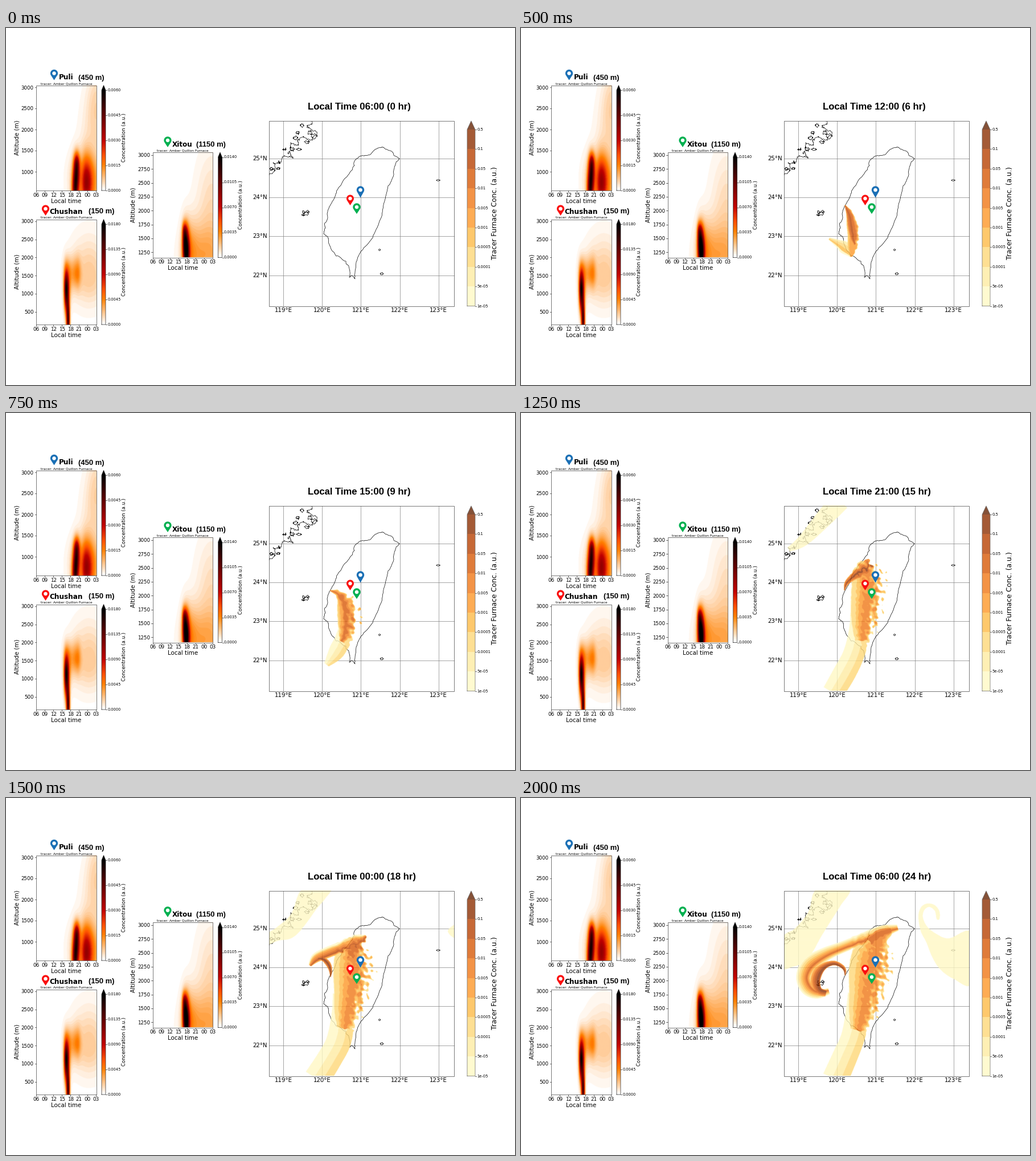
Write a matplotlib script that moves like this. It is 894 px wide and 626 px high and loops after 2.25 s.

```python
import numpy as np
import matplotlib.pyplot as plt
from matplotlib.animation import FuncAnimation
from matplotlib.patches import Circle, Polygon, Rectangle
from matplotlib.path import Path

W, H, DPI = 894, 626, 100
STEPS = 9
LEFT, RIGHT, TOP, BOTTOM = 462, 787, 163, 487.5
DEG = 68.2
SITE = "Amber Quillon Furnace"
BLUE, RED, GREEN = "#1a6fb5", "#fa0f0f", "#00b050"
HEAT = plt.get_cmap("gist_heat_r")
SCALE = plt.get_cmap("YlOrBr")(np.arange(1, 11) / 10)
SCALE[:, 3] = 0.8

rng = np.random.default_rng(12)
fig = plt.figure(figsize=(W / DPI, H / DPI), dpi=DPI, facecolor="white")
ax = fig.add_axes([0, 0, 1, 1])
ax.set(xlim=(0, W), ylim=(H, 0))
ax.axis("off")


def label(x, y, text, px, **style):
    style = {"ha": "center", "va": "center", "family": "DejaVu Sans"} | style
    return ax.text(x, y, text, size=px * 0.72, **style)


def line(xs, ys, color="0.15", lw=0.5, **style):
    return ax.plot(xs, ys, color=color, lw=lw, **style)[0]


def box(x0, y0, x1, y1, zorder=6):
    ax.add_patch(Rectangle((x0, y0), x1 - x0, y1 - y0, fill=False,
                           ec="0.25", lw=0.5, zorder=zorder))


def picture(data, x0, y0, x1, y1, **style):
    return ax.imshow(data, extent=(x0, x1, y1, y0), aspect="auto", **style)


def pin(x, y, color, r=6.7, drop=13.5):
    a = np.radians(np.linspace(155, 385, 40))
    outline = np.c_[x + r * np.cos(a), y + r * np.sin(a)]
    ax.add_patch(Polygon(np.vstack([outline, (x, y + drop)]), fc=color, lw=0, zorder=8))
    ax.add_patch(Circle((x, y), r * 0.49, fc="white", lw=0, zorder=9))


# ---- altitude / time panels ----

def bump(x, y, cx, cy, amp, left, right, up, down):
    """Gaussian with a separate spread on each side."""
    sx = np.where(x < cx, left, right)
    sy = np.where(y < cy, up, down)
    return amp * np.exp(-((x - cx) / sx) ** 2 - ((y - cy) / sy) ** 2)


def panel(x0, y0, name, name_x, height, height_x, color, pin_x,
          alts, alt_y, alt_step, top_value, bumps):
    x1, y1 = x0 + 105.5, y0 + 184.5
    x, y = np.meshgrid(np.linspace(0, 105.5, 211), np.linspace(0, 184.5, 369))
    field = 0.006 + sum(bump(x, y, *b) for b in bumps)
    field = np.floor(np.clip(field, 0, 1) * 60) / 60
    picture(HEAT(field), x0, y0, x1, y1, interpolation="bilinear")
    box(x0, y0, x1, y1)

    for i in range(8):
        tx = x0 + 15.07 * i
        line([tx, tx], [y1, y1 + 2.5])
        label(tx, y1 + 8.3, f"{(6 + 3 * i) % 24:02d}", 8.8)
    for i, alt in enumerate(alts):
        ty = y0 + alt_y + alt_step * i
        line([x0 - 2.5, x0], [ty, ty])
        label(x0 - 4.5, ty, str(alt), 8.7, ha="right", va="center_baseline")
    label(x0 + 53, y1 + 19, "Local time", 10.2)
    label(x0 - 34, y0 + 92, "Altitude (m)", 10.2, rotation=90)
    label(x0 + 53, y0 - 3, f"tracer: {SITE}", 6)

    # Colour bar with its pointed end
    bx, by = x0 + 115, y0 + 8.5
    shades = np.floor(np.linspace(1, 0, 180) * 60) / 60
    picture(HEAT(shades)[:, None], bx, by, bx + 7, y1)
    ax.add_patch(Polygon([(bx, by), (bx + 7, by), (bx + 3.5, y0)], fc="black", lw=0))
    line([bx, bx, bx + 3.5, bx + 7, bx + 7, bx], [y1, by, y0, by, y1, y1])
    for i in range(5):
        ty = y1 - 44 * i
        line([bx + 7, bx + 9], [ty, ty])
        label(bx + 10.3, ty, f"{top_value * i / 4:.4f}", 6.7, ha="left")
    label(x0 + 154.5, y0 + 92, "Concentration (a.u.)", 8.45, rotation=90)

    base = y0 - 10
    pin(pin_x, y0 - 21 if name != "Chushan" else y0 - 18.5, color, 6.6, 12)
    label(name_x, base, name, 12, ha="left", va="baseline", weight="bold")
    label(height_x, base, f"({height} m)", 13, ha="left", va="baseline",
          weight="bold", family="Liberation Sans")


panel(53, 100.5, "Puli", 92.5, 450, 127, BLUE, 84.5,
      range(3000, 500, -500), 3.5, 37, 0.006, [
          (71, 140, 0.62, 5, 5, 20, 40),
          (68, 184, 0.62, 5, 5, 36, 9),
          (88, 172, 0.42, 8, 11, 44, 40),
          (82, 165, 0.20, 20, 45, 45, 70),
          (100, 80, 0.05, 22, 30, 60, 60),
          (106, 25, 0.07, 17, 9, 50, 60)])
panel(257.5, 218, "Xitou", 291.5, 1150, 334.5, GREEN, 284,
      range(3000, 1000, -250), 5, 24.3, 0.014, [
          (55, 142, 0.52, 3.5, 5, 17, 40),
          (59, 176, 0.75, 5, 5, 34, 40),
          (58, 172, 0.20, 8, 17, 48, 60),
          (90, 184, 0.17, 32, 45, 58, 40),
          (103, 90, 0.07, 26, 20, 85, 90)])
panel(53, 335.5, "Chushan", 76.5, 150, 145, RED, 69.5,
      range(3000, 0, -500), 3.5, 31.7, 0.018, [
          (52.5, 124, 0.78, 3.5, 4.5, 27, 35),
          (56, 178, 0.80, 3, 2.8, 34, 40),
          (53, 95, 0.25, 5, 8, 25, 45),
          (72, 95, 0.20, 12, 6, 27, 25),
          (92, 100, 0.11, 30, 32, 64, 48)])


# ---- map ----

def jagged(points, amp, passes=3):
    """Roughen a polyline by displacing midpoints."""
    p = np.array(points, float)
    for _ in range(passes):
        mid = (p[1:] + p[:-1]) / 2 + rng.normal(0, amp, (len(p) - 1, 2))
        q = np.empty((2 * len(p) - 1, 2))
        q[::2], q[1::2] = p, mid
        p, amp = q, amp * 0.55
    return p


def coast(points, amp, passes=3):
    p = jagged(points, amp, passes)
    shape = line(p[:, 0], p[:, 1], "black", 0.5, zorder=2)
    shape.set_clip_path(Rectangle((LEFT, TOP), RIGHT - LEFT, BOTTOM - TOP,
                                  transform=ax.transData))


def islet(x, y, rx, ry, amp=0.8):
    a = np.linspace(0, 2 * np.pi, 7)
    coast(np.c_[x + rx * np.cos(a), y + ry * np.sin(a)], amp, 2)


east = [(662, 209), (669, 213), (677, 216), (681, 223), (691, 229), (685, 236),
        (682, 246), (681, 257), (677, 268), (671, 277), (668, 291), (663, 310),
        (660, 330), (652, 350), (644, 368), (636, 378), (628, 386), (620, 398),
        (615, 410), (614, 422), (612, 434), (613, 440), (607, 434), (603, 437)]
west = [(603, 437), (604, 428), (602, 417), (597, 409), (588, 403), (580, 400),
        (574, 392), (567, 378), (565, 366), (558, 360), (561, 350), (560, 342),
        (565, 333), (565, 322), (569, 312), (576, 300), (581, 285), (592, 268),
        (604, 253), (612, 241), (615, 230), (625, 224), (640, 222), (648, 213),
        (655, 210), (662, 209)]
mainland = [(535, 163), (529, 171), (546, 182), (538, 197), (522, 190), (514, 205),
            (500, 201), (496, 218), (504, 228), (485, 226), (480, 238), (469, 236),
            (473, 249), (462, 258)]
coast(east, 0.6)
coast(west, 0.9)
coast(mainland, 3.2, 5)
for x, y, rx, ry in [(520, 171, 3, 2), (541, 190, 5, 4), (529, 200, 4, 3),
                     (508, 193, 4, 3), (512, 184, 3, 2), (534, 183, 3, 3),
                     (489, 213, 3, 2), (515, 213, 4, 2), (478, 246, 3, 2),
                     (466, 247, 3, 3), (503, 212, 4, 3)]:
    islet(x, y, rx, ry, 1.3)
for x, y, rx, ry in [(527, 326, 4, 3), (523, 323, 2, 2), (530, 322, 2, 2), (522, 328, 2, 1)]:
    islet(x, y, rx, ry)
islet(759, 267, 3.3, 1.2, 0.2)
islet(656, 389, 1.5, 1.5, 0.2)
islet(660, 431, 2.8, 2.2, 0.5)

for i in range(5):
    gx = 487 + DEG * i
    line([gx, gx], [TOP, BOTTOM], "0.5", 0.5, zorder=1)
    label(gx, 495, f"{119 + i}°E", 10.2)
for i in range(4):
    gy = 229 + DEG * i
    line([LEFT, RIGHT], [gy, gy], "0.5", 0.5, zorder=1)
    label(459, gy, f"{25 - i}°N", 10.2, ha="right")
box(LEFT, TOP, RIGHT, BOTTOM)
pin(622.5, 284, BLUE)
pin(604.5, 299, RED, 6.5, 12)
pin(616, 314, GREEN, 6.7, 12)

ticks = ["1e-05", "5e-05", "0.0001", "0.0005", "0.001",
         "0.005", "0.01", "0.05", "0.1", "0.5"]
for i, tick in enumerate(ticks):
    y = BOTTOM - 34.4 * i
    if i < 9:
        ax.add_patch(Rectangle((810, y - 34.4), 14, 34.4, fc=SCALE[i], lw=0))
    line([824, 826], [y, y])
    label(827.5, y, tick, 6.8, ha="left")
ax.add_patch(Polygon([(810, 178), (824, 178), (817, 163)], fc=SCALE[9], lw=0))
line([810, 810, 817, 824, 824, 810], [BOTTOM, 178, 163, 178, BOTTOM, BOTTOM], "0.4")
label(858.5, 325, "Tracer Furnace Conc. (a.u.)", 12.1, rotation=90)
clock = label(530, 142.5, "", 16.7, ha="left", va="baseline", weight="bold",
              family="Liberation Sans")


# ---- plume ----

def smooth(points, closed=False, n=6):
    """Catmull-Rom curve through the points."""
    p = np.array(points, float)
    e = np.vstack([p[-1], p, p[:2]] if closed else [p[0], p, p[-1]])
    a, b, c, d = e[:-3], e[1:-2], e[2:-1], e[3:]
    t = np.linspace(0, 1, n, endpoint=False)[:, None, None]
    q = 0.5 * (2 * b + (c - a) * t + (2 * a - 5 * b + 4 * c - d) * t**2
               + (3 * b - a - 3 * c + d) * t**3)
    q = q.swapaxes(0, 1).reshape(-1, p.shape[1])
    return q if closed else np.vstack([q, p[-1]])


def waves(x, y, low, high, count=26):
    total = 0
    for _ in range(count):
        a, phase = rng.uniform(0, 2 * np.pi, 2)
        k = 2 * np.pi / rng.uniform(low, high)
        total = total + np.sin(k * (x * np.cos(a) + y * np.sin(a)) + phase)
    return total / np.sqrt(count / 2)


def ramp(v, start, end):
    t = np.clip((v - start) / (end - start), 0, 1)
    return t * t * (3 - 2 * t)


GX, GY = np.meshgrid(np.arange(LEFT + 0.25, RIGHT, 0.5), np.arange(TOP + 0.25, BOTTOM, 0.5))
# Mountain valleys fray the plume; over the sea it stays smooth.
rough = (ramp(GX, 588, 628) * ramp(GX, 672, 655) * ramp(GY, 246, 275) * ramp(GY, 420, 370))
hills = ramp(GX, 572, 590) * ramp(GX, 672, 655) * ramp(GY, 225, 250) * ramp(GY, 425, 395)
WX = GX + (5.5 * rough + 0.8 * hills) * waves(GX, GY, 7, 17)
WY = GY + (3.5 * rough + 0.8 * hills) * waves(GX, GY, 7, 17)


class Plume:
    def __init__(self):
        self.level = np.zeros(GX.shape, int)

    def fill(self, level, outline):
        (x0, y0), (x1, y1) = outline.min(0), outline.max(0)
        near = (WX >= x0) & (WX <= x1) & (WY >= y0) & (WY <= y1)
        inside = Path(outline).contains_points(np.c_[WX[near], WY[near]])
        self.level[near] = np.maximum(self.level[near], level * inside)

    def blob(self, points, level=1):
        self.fill(level, smooth(points, closed=True))

    def ribbon(self, points, *bands):
        """Points are (x, y, half width); bands are (level, width scale, shift)."""
        p = smooth(points)
        t = np.gradient(p[:, :2], axis=0)
        n = np.c_[-t[:, 1], t[:, 0]] / (np.hypot(*t.T)[:, None] + 1e-9)
        n *= np.maximum(p[:, 2:], 0.3)
        for level, scale, shift in bands:
            mid = p[:, :2] + shift * n
            self.fill(level, np.vstack([mid + scale * n, (mid - scale * n)[::-1]]))

    def image(self):
        colors = np.vstack([[*SCALE[0, :3], 0], SCALE])
        return colors[self.level]


TAIL = (1, 1, 0), (2, 0.62, -0.38), (3, 0.3, -0.7)
BODY = (2, 1.05, 0), (3, 1, 0), (4, 0.78, -0.12), (5, 0.58, -0.14), (6, 0.32, -0.2)
HOOK = ((1, 1.1, 0.1), (2, 0.95, 0.05), (3, 0.82, 0), (4, 0.62, -0.05),
        (5, 0.45, -0.1), (6, 0.26, -0.15), (7, 0.12, -0.2))
JET = (5, 1.4, 0.3), (6, 1.15, 0.15), (7, 1, 0), (8, 0.7, -0.15), (9, 0.38, -0.35)


def hour_0(p):
    pass


def hour_3(p):
    p.ribbon([(569, 312, 1), (574, 335, 5), (573, 356, 8), (560, 370, 7), (545, 372, 3)],
             (1, 1, 0), (3, 0.85, 0), (5, 0.65, 0), (7, 0.35, 0))


def hour_6(p):
    p.ribbon([(541, 370, 2), (556, 378, 6), (569, 386, 10), (582, 398, 5)],
             (1, 1.1, 0), (2, 0.85, -0.1), (3, 0.6, 0.1), (4, 0.3, 0.4))
    p.ribbon([(569, 311, 1), (577, 327, 6), (581, 345, 9), (583, 365, 9),
              (582, 385, 8), (580, 402, 2)], (3, 1.05, 0), (4, 0.95, 0), (5, 0.75, -0.1))
    p.ribbon([(569, 312, 1), (577, 328, 5), (581, 348, 7), (584, 366, 6), (586, 380, 2)],
             (6, 1, 0), (7, 0.75, 0), (8, 0.25, 0.1))


def hour_9(p):
    p.ribbon([(598, 365, 14), (594, 392, 14), (580, 420, 14), (563, 442, 5)], *TAIL)
    p.ribbon([(569, 312, 1), (584, 318, 6), (595, 334, 13), (599, 360, 15),
              (597, 385, 12), (590, 402, 4)],
             (3, 1.1, 0), (4, 0.95, 0), (5, 0.78, 0), (6, 0.5, 0), (7, 0.25, 0.1))


def hour_12(p):
    p.ribbon([(600, 345, 18), (599, 385, 17), (592, 418, 14), (582, 445, 17),
              (567, 466, 18), (551, 482, 5)], *TAIL)
    p.ribbon([(600, 277, 3), (605, 290, 14), (605, 312, 19), (603, 340, 19),
              (602, 370, 15), (605, 390, 8)],
             (3, 1.05, 0), (4, 0.9, -0.05), (5, 0.7, -0.1), (6, 0.35, 0))
    p.ribbon([(592, 302, 3), (604, 298, 6), (617, 299, 4)], (6, 1, 0), (7, 0.5, 0))
    p.ribbon([(567, 311, 0.5), (585, 310, 2.4), (605, 309, 3)], (7, 1.1, 0), (9, 0.6, 0))


def hour_15(p):
    p.ribbon([(560, 155, 18), (530, 188, 15), (495, 225, 10), (470, 240, 4)], (1, 1, 0))
    p.ribbon([(598, 350, 19), (594, 388, 19), (584, 425, 19), (568, 457, 20),
              (548, 491, 19)], *TAIL)
    p.ribbon([(606, 259, 7), (604, 278, 20), (606, 308, 25), (603, 342, 23),
              (600, 375, 18), (598, 400, 10)], *BODY)
    p.ribbon([(568, 312, 0.6), (572, 299, 3), (586, 286, 5), (603, 275, 8), (614, 266, 4)],
             (5, 1.4, 0), (6, 1.1, 0), (7, 0.8, 0), (9, 0.25, 0))


def hour_18(p):
    p.blob([(521, 160), (569, 160), (561, 177), (545, 196), (530, 217), (513, 238),
            (498, 248), (478, 251), (458, 258), (458, 240), (475, 228), (501, 204)])
    p.blob([(776, 234), (783, 226), (792, 223), (792, 246), (782, 243)])
    p.ribbon([(596, 345, 22), (593, 380, 21), (585, 425, 22), (570, 455, 22),
              (546, 493, 23)], *TAIL)
    p.ribbon([(615, 248, 12), (606, 275, 26), (606, 305, 30), (603, 340, 26),
              (598, 375, 21), (594, 405, 12)], *BODY)
    p.ribbon([(633, 245, 3), (614, 254, 8), (590, 264, 7), (565, 274, 7),
              (545, 283, 6), (534, 295, 2)],
             (1, 1.4, 0.3), (3, 1.2, 0.1), (4, 1.05, 0), (5, 0.9, 0),
             (6, 0.65, -0.1), (7, 0.4, -0.3), (8, 0.15, -0.4))
    p.ribbon([(623, 252, 4), (611, 262, 9), (606, 280, 5)], (6, 1.3, 0), (7, 0.9, 0))
    p.ribbon([(570, 315, 0.5), (570, 303, 2), (566, 292, 3), (558, 284, 2.5), (548, 282, 1)],
             (5, 1.6, 0), (7, 1.2, 0), (9, 0.6, 0))


def hour_21(p):
    p.blob([(521, 160), (576, 160), (561, 185), (541, 211), (521, 240), (504, 264),
            (487, 280), (458, 287), (458, 247), (480, 229), (505, 200)])
    p.blob([(718, 190), (721, 206), (728, 222), (741, 238), (760, 246), (792, 241),
            (792, 285), (772, 283), (752, 274), (734, 258), (721, 238), (714, 214)])
    p.ribbon([(597, 345, 23), (592, 380, 21), (584, 422, 22), (570, 452, 23),
              (549, 493, 24)], *TAIL)
    p.ribbon([(632, 241, 9), (613, 265, 26), (608, 300, 31), (604, 340, 26),
              (598, 375, 21), (592, 405, 11)], *BODY)
    p.ribbon([(650, 238, 4), (625, 246, 8), (597, 257, 8), (565, 268, 8), (538, 281, 11),
              (521, 298, 11), (517, 316, 8), (525, 328, 4)], *HOOK)
    p.ribbon([(630, 244, 4), (612, 255, 7), (604, 268, 4)], (6, 1.3, 0), (7, 0.8, 0))
    p.ribbon([(569, 313, 0.6), (569, 303, 2), (563, 294, 2.5), (551, 289, 2.8),
              (538, 293, 4), (529, 304, 5), (526, 317, 5), (529, 326, 3)], *JET)


def hour_24(p):
    p.blob([(520, 160), (577, 160), (561, 190), (542, 220), (526, 246), (512, 271),
            (495, 290), (476, 297), (458, 298), (458, 247), (482, 229), (505, 200)])
    p.blob([(698, 208), (703, 192), (714, 186), (727, 189), (735, 200), (735, 213),
            (730, 213), (727, 199), (717, 192), (708, 198), (706, 211), (714, 227),
            (731, 240), (752, 247), (792, 237), (792, 326), (760, 318), (736, 301),
            (722, 279), (712, 254), (702, 234)])
    p.ribbon([(597, 345, 23), (592, 380, 22), (583, 420, 21), (570, 452, 22),
              (552, 493, 23)], *TAIL)
    p.ribbon([(648, 231, 8), (628, 246, 18), (615, 275, 31), (609, 305, 32),
              (604, 340, 27), (598, 375, 22), (591, 408, 12)], *BODY)
    p.ribbon([(662, 229, 5), (635, 236, 10), (600, 250, 10), (568, 262, 9), (535, 276, 11),
              (509, 294, 14), (499, 315, 13), (506, 334, 12), (522, 343, 8),
              (541, 339, 5)], *HOOK)
    p.ribbon([(650, 233, 3), (630, 240, 6), (612, 252, 5)], (6, 1.4, 0), (7, 0.9, 0))
    p.ribbon([(569, 312, 0.6), (568, 302, 2), (561, 295, 2.5), (549, 291, 3),
              (534, 296, 4), (523, 308, 6), (519, 324, 6), (524, 338, 5), (536, 342, 4)], *JET)


def render(stage):
    plume = Plume()
    stage(plume)
    return plume.image()


images = [render(stage) for stage in (hour_0, hour_3, hour_6, hour_9, hour_12,
                                      hour_15, hour_18, hour_21, hour_24)]
layer = picture(images[0], LEFT, TOP, RIGHT, BOTTOM, interpolation="bilinear", zorder=3)


def update(step):
    hours = 3 * step
    layer.set_data(images[step])
    clock.set_text(f"Local Time {(6 + hours) % 24:02d}:00 ({hours} hr)")
    return layer, clock


anim = FuncAnimation(fig, update, frames=STEPS, interval=250, repeat=True)
plt.show()
```
